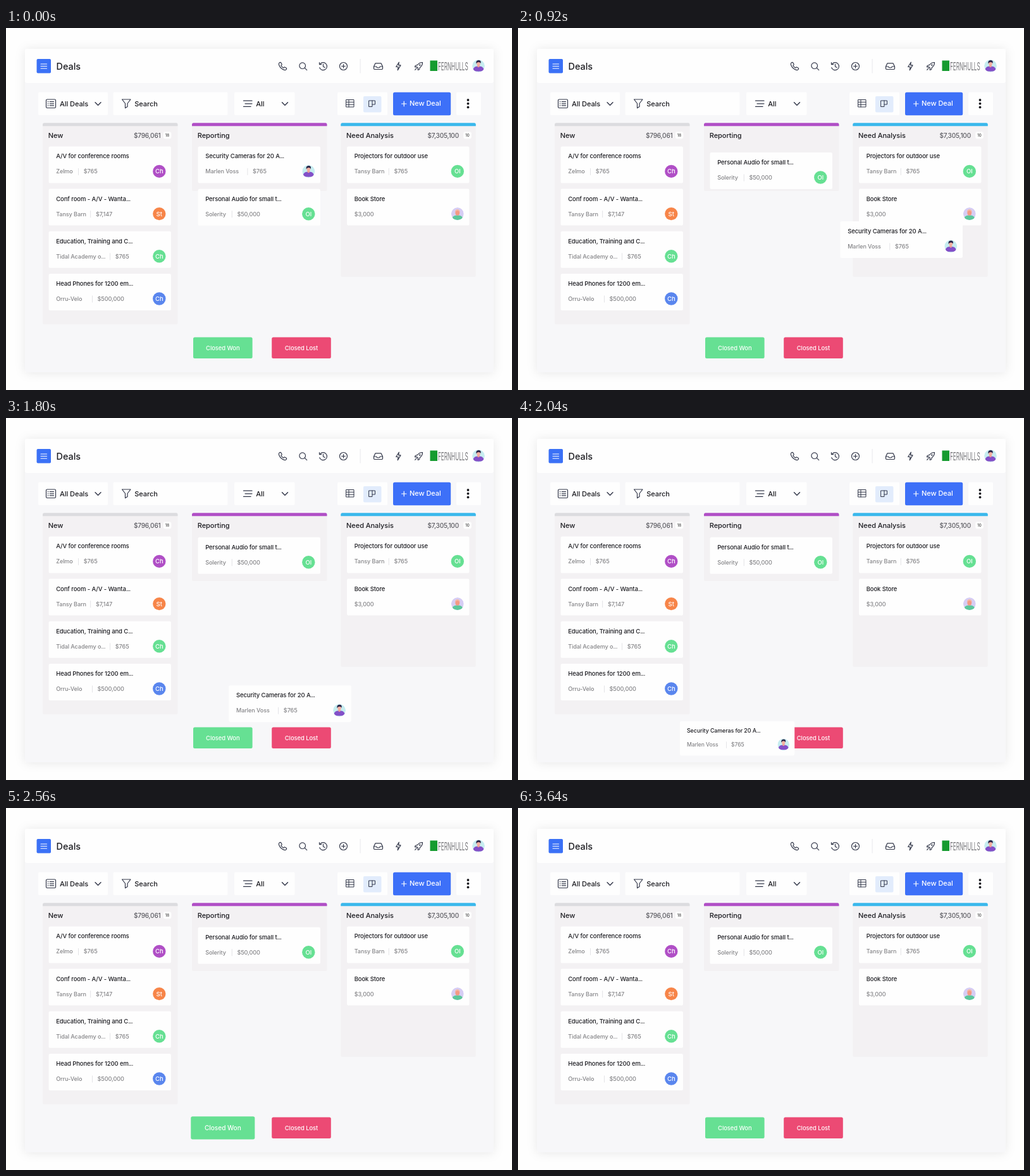
An HTML page that plays this animation: 800 by 573 pixels, repeating every 3.68 s.

```html
<!DOCTYPE html>
<html lang="en">
<head>
<meta charset="utf-8">
<title>Deals board</title>
<style>
html, body { margin: 0; width: 100%; height: 100%; overflow: hidden; background: #fefefe; }
svg { display: block; }
text { font-family: Inter, "Open Sans", sans-serif; font-weight: 500; fill: #1d1d22; }
.page { font-size: 14.4px; }
.label { font-size: 11px; letter-spacing: -.06px; }
.title { font-size: 9.5px; letter-spacing: -.1px; }
.sub { font-size: 9.1px; letter-spacing: -.1px; fill: #858588; }
.sum { font-size: 10.1px; letter-spacing: -.25px; fill: #5c5c62; }
.badge { font-size: 6.2px; text-anchor: middle; fill: #444; }
.initials { font-size: 9.5px; text-anchor: middle; fill: #fff; }
.btn { font-size: 9.4px; letter-spacing: -.05px; text-anchor: middle; fill: #fff; }
.dots { letter-spacing: -.6px; }
.line { fill: none; stroke: #33384a; stroke-width: 1.2; stroke-linecap: round; stroke-linejoin: round; }
</style>
</head>
<body>
<svg id="stage" width="800" height="573" viewBox="0 0 800 573"></svg>
<script>
const PURPLE = '#b04fc6', ORANGE = '#f78549', GREEN = '#66e093', BLUE = '#5a86ee';

const rect = (x, y, w, h, fill, r = 0) =>
  `<rect x="${x}" y="${y}" width="${w}" height="${h}" rx="${r}" fill="${fill}"/>`;
const circle = (x, y, r, fill) => `<circle cx="${x}" cy="${y}" r="${r}" fill="${fill}"/>`;
const path = (d, extra = '') => `<path class="line" d="${d}" ${extra}/>`;
const at = (x, y, body) => `<g transform="translate(${x} ${y})">${body}</g>`;
const text = (cls, x, y, s, extra = '') => {
  const body = s.replace('...', '<tspan class="dots">...</tspan>');
  return `<text class="${cls}" x="${x}" y="${y}" ${extra}>${body}</text>`;
};

const initials = (s, fill) => circle(0, 0, 10.2, fill) + text('initials', 0, 3.4, s);

// Drawn portraits, clipped to the round avatar
const man = `<g clip-path="url(#round)">${circle(0, 0, 10, '#c6edf0')}
  <path d="M-9 7.500C-8 1-4 .500 0 .500S8 1 9 7.500Q0 10 -9 7.500Z" fill="#8350c8"/>
  <path d="M-1.700-2H1.700V1.500Q0 3-1.700 1.500Z" fill="#ee9f94"/>
  <ellipse cx="0" cy="-3.700" rx="2.800" ry="3.500" fill="#f5b0a2"/>
  <path d="M-3.600-3.500Q-4.500-8.800 0-9Q4.800-9 3.500-4Q2.600-6 0-6Q-2.600-6-3.600-3.500Z" fill="#2b2548"/></g>`;
const elder = `<g clip-path="url(#round)">${circle(0, 0, 10, '#d6cdf4')}
  <path d="M-9 10C-9 4-5 2.500 0 2.500S9 4 9 10Z" fill="#5cc79b"/>
  <ellipse cx="0" cy="-1.500" rx="3.400" ry="4.200" fill="#f39a83"/>
  <path d="M-4-2Q-4-7 0-7T4-2Q2-5 0-5T-4-2Z" fill="#f3b9a8"/></g>`;

// sep is the divider's place inside the card; without it only the amount shows
function card(title, who, sep, amount, face) {
  const info = who
    ? text('sub', 11.7, 43, who) + rect(sep, 34.5, .8, 11, '#dcdce0') + text('sub', sep + 8.6, 43, amount)
    : text('sub', 11.7, 43, amount);
  return rect(0, 0, 193.5, 58, '#fefefe', 2.5) + text('title', 11.7, 19, title) + info + at(174.8, 39.5, face);
}

function column(x, bottom, color, name) {
  return rect(x, 152, 213.5, bottom - 152, '#f3f1f3', 2) +
    `<path d="M${x} 155.300v-2.500q0-2.500 2.500-2.500h208.500q2.500 0 2.500 2.500v2.500z" fill="${color}"/>` +
    text('label', x + 8.8, 173.5, name);
}

const total = (x, s, bx, n) => text('sum', x, 173.5, s) +
  rect(bx - 6.5, 164, 13, 11.5, '#fdfdfd', 4) + text('badge', bx, 172.2, n);

const chevron = (x, y) => path(`M${x - 4.5} ${y - 2.3}l4.500 4.600 4.500-4.600`, 'style="stroke-width:1.4"');

const header = rect(30, 33, 741, 54, '#fefefe', 3) +
  rect(48.5, 49, 22.5, 22.5, '#3b71f6', 2) +
  path('M55 57h9.500M55 60.500h9.500M55 64h9.500', 'style="stroke:#fff;stroke-width:1.1"') +
  text('page', 79.5, 66.2, 'Deals') +
  at(437.5, 60.5, path('M-5.500-5.300Q-3.800-7-2.600-5.400L-1.400-3Q-1-2.200-2.600-.900Q-1.300 1.700 1.200 2.700Q2.300 1 3.200 1.500L5.500 2.800Q6.800 3.700 5.300 5.400Q3.500 7.300-.700 4.600Q-4.300 2.300-6-2Q-6.500-4.200-5.500-5.300Z')) +
  at(469.5, 60.5, path('M4-.800A4.800 4.800 0 1 1-5.600-.800A4.800 4.800 0 1 1 4-.800M2.700 2.700L6.200 6.200')) +
  at(501.5, 60.5, path('M-5-3.200A6 6 0 1 1-5.700 2.200M-6-5.800V-2.800H-2.800M0-3.200V.500L2.600 2')) +
  at(533.5, 60.5, path('M6 0A6 6 0 1 1-6 0A6 6 0 1 1 6 0M-2.800 0H2.800M0-2.800V2.800')) +
  rect(559.7, 49, .8, 22.5, '#e3e3e8') +
  at(588.5, 60.5, path('M-7 .500L-4.600-4.600H4.600L7 .500V3.600Q7 5 5.600 5H-5.600Q-7 5-7 3.600ZM-7 .500H-3Q-2.500 2.500 0 2.500T3 .500H7')) +
  at(620.3, 60.5, path('M1-6.300L-3.600 1H-.200L-1 6.300L3.700-1.600H.300Z')) +
  at(652.5, 60.5, path('M6-6Q1.500-6.300-2.200-1.800L-5.300-1L-6 1.200L-3 1L-1 3L-1.200 6L1 5.300L1.800 2.200Q6.300-1.500 6-6ZM-3.400 3.200L-5.800 5.800')) +
  circle(654.3, 58.6, 1.2, '#33384a') +
  rect(670.5, 51.5, 11.5, 16.5, '#169b2f') +
  `<g transform="translate(683 66.500) scale(.48 1)">${text('mark', 0, 0, 'FERNHULLS',
    'style="font-size:17px;font-weight:400;fill:#77777b"')}</g>` +
  at(747, 60, man);

const toolbar = [[51, 110], [169.5, 181], [361, 95.5], [524, 79], [712, 39]]
    .map(([x, w]) => rect(x, 101.5, w, 36.5, '#fefefe', 2)).join('') +
  path('M65 113H77Q78.500 113 78.500 114.500V125Q78.500 126.500 77 126.500H65Q63.500 126.500 63.500 125V114.500Q63.500 113 65 113ZM66.300 116.700h.500M69.300 116.700h6.200M66.300 119.800h.500M69.300 119.800h6.200M66.300 122.900h.500M69.300 122.900h6.200') +
  text('label', 85, 123.5, 'All Deals') + chevron(145.5, 120) +
  path('M183.500 113H197L192 119.500V124.500L188.500 126.700V119.500Z') +
  text('label', 203.3, 123.5, 'Search') +
  path('M375.500 115.200H389M378 119.800H389M375.500 124.400H387') +
  text('label', 395.3, 123.5, 'All') + chevron(441, 120) +
  path('M538 113.500H550V125H538ZM538 117.300H550M538 121.200H550M542 113.500V125', 'style="stroke-width:1"') +
  rect(565, 108, 28.5, 25.5, '#e2ecfc', 2) +
  path('M574 115H583.500V121H579V124.500H574ZM579 115V121', 'style="stroke-width:1"') +
  rect(612, 101.8, 91.2, 36.5, '#3d70f8', 2.5) +
  path('M625.500 120H633M629.250 116.200V123.800', 'style="stroke:#fff"') +
  text('label', 638, 123.3, 'New Deal', 'style="fill:#fff"') +
  [114, 119.7, 125.4].map(y => circle(730.5, y, 1.9, '#1d1d22')).join('');

const leads = [
  ['A/V for conference rooms', 'Zelmo', 46.7, '$765', initials('Ch', PURPLE)],
  ['Conf room - A/V - Wanta...', 'Tansy Barn', 65.8, '$7,147', initials('St', ORANGE)],
  ['Education, Training and C...', 'Tidal Academy o...', 96.7, '$765', initials('Ch', GREEN)],
  ['Head Phones for 1200 em...', 'Orru-Velo', 68.5, '$500,000', initials('Ch', BLUE)]
];

const board = column(58, 469, '#dcdcdf', 'New') + total(202, '$796,061', 255, '18') +
  column(294, 258, PURPLE, 'Reporting') +
  column(529.3, 394, '#3ab8ec', 'Need Analysis') + total(666.5, '$7,305,100', 729.5, '10') +
  leads.map((c, i) => at(67.5, 187.4 + i * 67.2, card(...c))).join('') +
  at(539, 187.4, card('Projectors for outdoor use', 'Tansy Barn', 65.8, '$765', initials('Ol', GREEN))) +
  at(539, 254.6, card('Book Store', '', 0, '$3,000', elder));

const button = (label, fill) => rect(-46.8, -16.8, 93.6, 33.6, fill, 2.5) + text('btn', 0, 3.4, label);

const stage = document.getElementById('stage');
stage.innerHTML = `<defs>
  <clipPath id="round"><circle r="10"/></clipPath>
  <filter id="soft" x="-10%" y="-10%" width="120%" height="120%">
    <feDropShadow dx="0" dy="1" stdDeviation="8" flood-color="#000" flood-opacity=".09"/></filter></defs>
  ${rect(0, 0, 800, 573, '#fefefe')}
  <g filter="url(#soft)">${rect(30, 33, 741, 512, '#f7f7f9', 3)}</g>
  ${header}${toolbar}${board}
  <g id="won">${button('Closed Won', GREEN)}</g>
  ${at(467, 506.3, button('Closed Lost', '#ec4a74'))}
  <g id="drag">${card('Security Cameras for 20 A...', 'Marlen Voss', 78, '$765', man)}</g>
  <g id="next">${card('Personal Audio for small t...', 'Solerity', 53.3, '$50,000', initials('Ol', GREEN))}</g>`;

const [won, drag, next] = ['won', 'drag', 'next'].map(id => document.getElementById(id));

// Ease-in-out, cubic-bezier(.42, 0, .58, 1)
function ease(x) {
  if (x <= 0) return 0;
  if (x >= 1) return 1;
  let lo = 0, hi = 1, s = x;
  for (let i = 0; i < 24; i++) {
    s = (lo + hi) / 2;
    const bx = 1.26 * s * (1 - s) ** 2 + 1.74 * s * s * (1 - s) + s ** 3;
    if (bx < x) lo = s; else hi = s;
  }
  return s * s * (3 - 2 * s);
}
const span = (t, from, to) => ease((t - from) / (to - from));

function draw(t) {
  const a = span(t, 376, 1098), b = span(t, 1381, 2103);
  const cx = 400.25 + 235.5 * a - 293.5 * b;
  const cy = 216.4 + 135.6 * a + 157.5 * b;
  const size = 1 - span(t, 1997, 2240);
  drag.setAttribute('transform', `translate(${cx} ${cy}) scale(${size}) translate(-96.75 -29)`);
  drag.setAttribute('visibility', size > 0 ? 'visible' : 'hidden');
  next.setAttribute('transform', `translate(303.500 ${254.7 - 66 * a})`);
  const pulse = 1 + .3 * (span(t, 2460, 2740) - span(t, 2740, 3020));
  won.setAttribute('transform', `translate(342.800 506.300) scale(${pulse})`);
}

const LOOP = 3680, STEP = 40;
const start = performance.now();
function tick() {
  const t = (performance.now() - start) % LOOP;
  draw(Math.floor(t / STEP) * STEP);
  requestAnimationFrame(tick);
}
draw(0);
requestAnimationFrame(tick);
</script>
</body>
</html>
```
